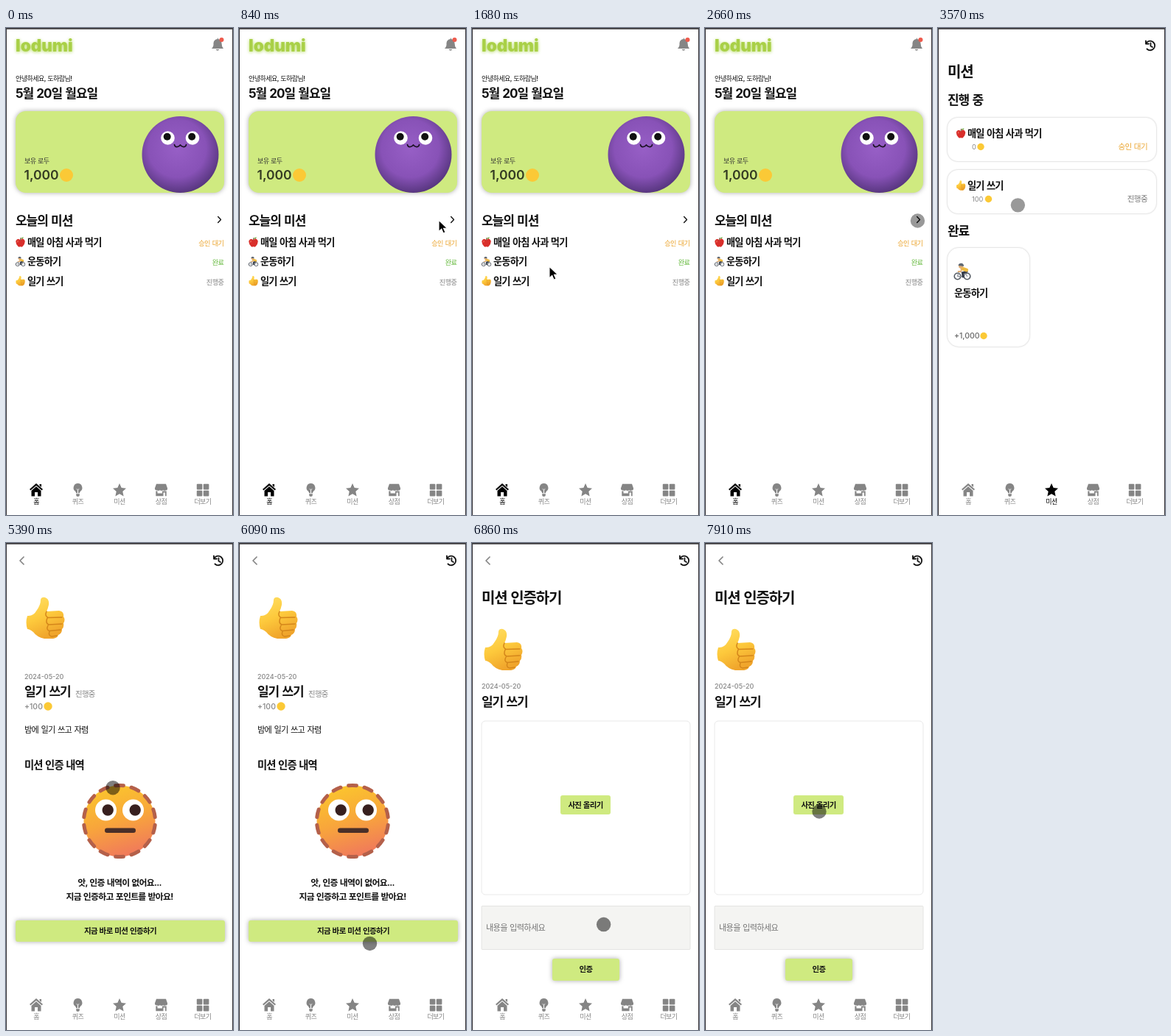
An HTML page that plays this animation: 308x662 px, repeating every 8 s.

```html
<!DOCTYPE html>
<html lang="ko">
<head>
<meta charset="utf-8">
<style>
  html, body { margin: 0; width: 100%; height: 100%; overflow: hidden; background: #fff; }
  svg { display: block; }
  text { font-family: Inter, "Noto Sans CJK KR", "Noto Sans CJK", sans-serif; letter-spacing: -.06em; word-spacing: .07em; white-space: pre; }
  .latin { letter-spacing: 0; }
  .card { fill: #fff; filter: drop-shadow(0 .6px 1px #0004); }
  .raised { filter: drop-shadow(0 .5px 3px #0005); }
  .glow { filter: drop-shadow(0 1px 2px #b8dc6a); }
</style>
</head>
<body>
<svg id="stage" width="308" height="662" viewBox="0 0 308 662">
  <defs>
    <radialGradient id="purple" cx=".46" cy=".42" r=".58">
      <stop offset="0" stop-color="#975fc6"/><stop offset=".65" stop-color="#8852b7"/><stop offset="1" stop-color="#593781"/>
    </radialGradient>
    <linearGradient id="orange" x1=".3" y1="0" x2=".6" y2="1">
      <stop offset="0" stop-color="#fbc62d"/><stop offset=".5" stop-color="#f8a63b"/><stop offset="1" stop-color="#f0785c"/>
    </linearGradient>
    <linearGradient id="skin" x1="0" y1="0" x2=".4" y2="1">
      <stop offset="0" stop-color="#ffe065"/><stop offset=".55" stop-color="#fdc93c"/><stop offset="1" stop-color="#f0a52c"/>
    </linearGradient>
    <symbol id="thumb" viewBox="0 0 54 58">
      <path fill="url(#skin)" d="M3 26Q11 27 16 18Q21 11 21 4Q22 0 27 1Q33 3 32 11Q31 16 29 20L46 19Q53 20 52 27Q55 31 52 36Q53 41 50 44Q50 50 45 52Q44 56 38 57L26 57Q16 55 11 48Q6 44 3 44Q0 35 3 26Z"/>
      <path fill="none" stroke="#d4861a" stroke-width="1.5" stroke-linecap="round" d="M29 20Q26 26 31 28.500L50 28M30 29Q27 36 32 38L50 37M31 39Q28 45 33 46.500L48 45M33 47Q31 53 36 54L43 53"/>
    </symbol>
    <symbol id="apple" viewBox="0 0 14 14">
      <path fill="#d92f2b" d="M7 4.5Q10-.1 13 5Q14 9 10 13Q8.500 14 7 13Q5.500 14 4 13Q0 9 1 5Q4 1 7 4.500Z"/>
      <path fill="#ef6b5c" d="M3 5Q5 4 4 7Q2 9 3 5Z"/>
      <path fill="none" stroke="#6d4325" d="M7 4.500L7.500 1"/>
      <path fill="#5da832" d="M7.500 2.500Q9 0 11.500.5Q10.500 3 7.500 2.500Z"/>
    </symbol>
    <symbol id="cyclist" viewBox="0 0 24 24">
      <g fill="none" stroke-linecap="round" stroke-linejoin="round">
        <path stroke="#535a62" stroke-width="1.600" d="M1.200 18.500a4.300 4.300 0 1 0 8.600 0a4.300 4.300 0 1 0-8.600 0M14.200 18.500a4.300 4.300 0 1 0 8.600 0a4.300 4.300 0 1 0-8.600 0"/>
        <path stroke="#8d939b" stroke-width="1.300" d="M5.500 18.500L7.500 12L16 14L11.500 19ZM16 14L18.500 18.500"/>
        <path stroke="#343b48" stroke-width="3" d="M18 12L12.500 14L13 19"/>
        <path stroke="#eebc42" stroke-width="5" d="M17.500 10L12 8"/>
        <path stroke="#e2ad72" stroke-width="1.800" d="M11 9L10 12L6.500 12"/>
      </g>
      <circle cx="10" cy="4.800" r="3" fill="#e2ad72"/>
      <path fill="#5f6873" d="M6.500 4Q7 .5 11 .7Q14 1 14 5Z"/>
    </symbol>
    <symbol id="home" viewBox="0 0 18 18">
      <path d="M9 0L18 8L16.600 9.600L9 2.900L1.400 9.600L0 8ZM13.500 1h2.500v4l-2.500-2ZM9 4.300L15.500 10V17.500H11V12H7V17.500H2.500V10Z"/>
    </symbol>
    <symbol id="bulb" viewBox="0 0 18 18">
      <path d="M9 0A6 6 0 0 0 5.500 10.800Q6.500 12 6.600 13.300H11.400Q11.500 12 12.500 10.800A6 6 0 0 0 9 0ZM6.700 14.300h4.600v2q0 1.700-2.300 1.700t-2.300-1.700Z"/>
      <path fill="none" stroke="#fff" stroke-width="1" d="M7.300 7.500L9 9L10.700 7.500M9 9V13.500"/>
    </symbol>
    <symbol id="star" viewBox="0 0 18 18"><path d="M9 0L11.700 6L18 6.700L13.300 11L14.600 17.500L9 14.200L3.400 17.500L4.700 11L0 6.700L6.300 6Z"/></symbol>
    <symbol id="store" viewBox="0 0 18 18">
      <path d="M2.500.8h13L17.700 7Q17.500 9.800 15 9.500Q13 10.500 12 9.300Q9 10.800 7.500 9.300Q5 10.500 3.700 9.500Q.5 9.800.3 7ZM1.800 10.500H4V13.500H10.500V10.500H12V17.300H1.800ZM12 10.500H16.200V17.300H14.500V12.500H12Z"/>
    </symbol>
    <symbol id="grid" viewBox="0 0 18 18">
      <rect x=".8" y=".8" width="7.600" height="7.600" rx="1"/><rect x="9.800" y=".8" width="7.600" height="7.600" rx="1"/>
      <rect x=".8" y="9.800" width="7.600" height="7.600" rx="1"/><rect x="9.800" y="9.800" width="7.600" height="7.600" rx="1"/>
    </symbol>
  </defs>
  <rect width="308" height="662" fill="#fff"/>
  <g id="pages"></g>
  <path fill="#3a383b" d="M0 0H308V662H307V1.800H1V662H0Z"/>
  <path id="arrow" fill="#000" stroke="#fff" stroke-width="1.100" d="M0 0V15.500L3.700 12L6.200 17.800L9 16.600L6.500 11H11.500Z"/>
  <g id="touch">
    <circle r="9.700"/>
    <circle id="ring" r="21.500" fill="none" stroke="#000" stroke-width="1.500"/>
  </g>
</svg>
<script>
const LOOP = 8000;
const GRAY = '#858585', AMBER = '#eba52f', LIME = '#cfea80';

// y is the vertical middle of the glyphs
const text = (x, y, size, str, { weight = 400, fill = '#111', anchor = 'start', cls = '' } = {}) =>
  `<text x="${x}" y="${y + size * .36}" font-size="${size}" font-weight="${weight}" fill="${fill}" text-anchor="${anchor}" class="${cls}">${str}</text>`;
const bold = (x, y, size, str, opts) => text(x, y, size, str, { weight: 700, ...opts });
const latin = (x, y, size, str, opts) => text(x, y, size, str, { fill: GRAY, cls: 'latin', weight: 500, ...opts });
const box = (x, y, w, h, r, attrs) => `<rect x="${x}" y="${y}" width="${w}" height="${h}" rx="${r}" ${attrs}/>`;
const icon = (id, x, y, w, h = w, fill = GRAY) =>
  `<use href="#${id}" x="${x}" y="${y}" width="${w}" height="${h}" fill="${fill}"/>`;
const circle = (x, y, r, fill) => `<circle cx="${x}" cy="${y}" r="${r}" fill="${fill}"/>`;
const line = (d, stroke, width) =>
  `<path d="${d}" fill="none" stroke="${stroke}" stroke-width="${width}" stroke-linecap="round" stroke-linejoin="round"/>`;
const coin = (x, y, r = 4.7) => circle(x, y, r, '#fbc936');
const button = (x, y, w, h, label, size) =>
  box(x, y, w, h, 3, `fill="${LIME}" class="raised"`) +
  bold(x + w / 2, y + h / 2 - .5, size, label, { anchor: 'middle' });

const nav = active => [['home', '홈'], ['bulb', '퀴즈'], ['star', '미션'], ['store', '상점'], ['grid', '더보기']]
  .map(([id, label], i) => {
    const x = 41 + i * 56.5, fill = i === active ? '#000' : GRAY;
    return icon(id, x - 9, 619, 18, 18, fill) + text(x, 644, 9, label, { fill, anchor: 'middle' });
  }).join('');

const history = line('M283 20A6.300 6.300 0 1 1 283.500 28.500M282 17.500V21.500H286M288.500 20.500V24.500L291 26', '#111', 1.8);
const back = line('M24 19L19 24L24 29', GRAY, 1.7);

const mascot = `
  ${circle(236.5, 172, 52, 'url(#purple)')}
  ${[219.5, 253].map(x => circle(x, 149.5, 9.3, '#fff') + circle(x - .8, 147.7, 5, '#111')).join('')}
  ${line('M228.500 158.500Q229 162 232.500 161.500Q235 161 236.500 159Q238 161 240.500 161.500Q244 162 244.500 158.500', '#191020', 1.7)}`;

const bell = `
  <path fill="${GRAY}" d="M279 28Q282 25 281.500 20.500Q282 15.500 287 15V13.500Q288 13 288 15Q292.500 16 292.500 20.500Q292.500 25 295 28ZM284.500 29H289.500Q287 32.500 284.500 29Z"/>
  ${circle(292.5, 16, 3, '#ee5a4c')}`;

const homeRows = [['apple', '매일 아침 사과 먹기', '승인 대기', AMBER], ['cyclist', '운동하기', '완료', '#65b93d'], ['thumb', '일기 쓰기', '진행중', GRAY]]
  .map(([id, name, state, fill], i) => {
    const y = 291 + i * 26.4;
    return icon(id, 12.5, y - 7, 14) + bold(29, y, 13.2, name) + text(295.5, y + 1.5, 9.2, state, { fill, anchor: 'end' });
  }).join('');

const homePage = `
  ${text(13, 24, 22.5, 'lodumi', { weight: 900, fill: '#a9d047', cls: 'latin glow' })}${bell}
  ${text(13, 69, 9, '안녕하세요, 도하람님!', { weight: 500 })}
  ${bold(13, 88.5, 17, '5월 20일 월요일')}
  ${box(13, 113, 283, 111, 14, `fill="${LIME}" class="raised"`)}${mascot}
  ${text(25, 181, 9, '보유 로두', { weight: 500, fill: '#333' })}
  ${latin(24.5, 200, 17.5, '1,000', { weight: 600, fill: '#333a22' })}${coin(82, 200, 9)}
  ${bold(13, 262, 17, '오늘의 미션')}${line('M287.700 256.500L291.500 260.500L287.700 264.500', '#111', 1.4)}
  ${homeRows}${nav(0)}`;

const missionCard = (y, id, name, points, coinX, state, fill) => `
  ${box(13, y, 283, 59, 14, 'class="card"')}${icon(id, 24, y + 14, 14)}
  ${bold(40, y + 21.5, 13.2, name)}${latin(46, y + 39.5, 9.2, points, { weight: 400 })}${coin(coinX, y + 39.5)}
  ${text(284, y + 39.5, 10.6, state, { fill, anchor: 'end' })}`;

const missionsPage = `
  ${history}${bold(13, 60, 20, '미션')}${bold(13, 98, 17, '진행 중')}
  ${missionCard(122, 'apple', '매일 아침 사과 먹기', '0', 58, '승인 대기', AMBER)}
  ${missionCard(193, 'thumb', '일기 쓰기', '100', 68.5, '진행중', '#777')}
  ${bold(13, 275.5, 17, '완료')}${box(13, 299, 111, 134, 15, 'class="card"')}
  ${icon('cyclist', 21, 319, 24)}${bold(22, 360, 13.2, '운동하기')}
  ${latin(22, 418, 10.5, '+1,000', { fill: '#666' })}${coin(62, 418.5)}
  ${nav(2)}`;

const face = `
  ${circle(154, 378, 48.5, 'url(#orange)')}
  <circle cx="154" cy="378" r="48.500" fill="none" stroke="#b4604a" stroke-width="5" stroke-linecap="round" pathLength="14" stroke-dasharray=".5 .5" stroke-dashoffset=".25" transform="rotate(-90 154 378)"/>
  ${[135.5, 172.5].map(x => circle(x, 363, 14.5, '#fff') + circle(x + 2.7, 363, 7.7, '#38201f')).join('')}
  ${box(134, 387.5, 42, 6.5, 3.2, 'fill="#4a2f28"')}`;

const detailPage = `
  ${back}${history}${icon('thumb', 26, 73, 54, 58)}
  ${latin(25, 182, 9, '2024-05-20')}
  ${bold(25, 202, 17, '일기 쓰기')}${text(94, 205, 10.4, '진행중', { fill: GRAY })}
  ${latin(25, 222, 10.5, '+100')}${coin(57, 222, 5.7)}
  ${text(25, 254, 11.2, '밤에 일기 쓰고 자렴')}
  ${bold(25, 302, 14.3, '미션 인증 내역')}${face}
  ${bold(154, 461.5, 11.9, '앗, 인증 내역이 없어요...', { anchor: 'middle' })}
  ${bold(154, 481, 11.9, '지금 인증하고 포인트를 받아요!', { anchor: 'middle' })}
  ${button(13, 513, 284, 29, '지금 바로 미션 인증하기', 10.5)}${nav()}`;

const uploadPage = `
  ${back}${history}${bold(13, 75, 20, '미션 인증하기')}${icon('thumb', 15, 116, 54, 58)}
  ${latin(13, 195, 9, '2024-05-20')}${bold(13, 215.5, 17, '일기 쓰기')}
  ${box(13, 242, 283, 236, 5, 'fill="#fff" stroke="#e9e9e9"')}
  ${box(120, 343, 68, 26, 3, `fill="${LIME}"`)}${bold(154, 356, 10.4, '사진 올리기', { anchor: 'middle' })}
  ${box(13, 493.5, 283, 59, 1, 'fill="#f4f4f2" stroke="#e4e4e2"')}${text(19, 523, 11.2, '내용을 입력하세요', { fill: '#777' })}
  ${button(109, 565, 91, 30, '인증', 10.4)}${nav()}`;

const pageStarts = [0, 2940, 5180, 6580];
const clicks = [[2310, 2450], [2800, 2940], [4900, 5040], [6370, 6510], [7770, 7910]];
// time, x, y
const route = [
  [490, 312, 310], [850, 270, 260], [1330, 197, 375], [1470, 150, 422], [1680, 104.5, 324.5], [1890, 200, 290],
  [2100, 292, 247], [2240, 290, 262], [2590, 290, 262], [2660, 288.5, 262], [2800, 285.5, 260.5],
  [2940, 288.5, 262], [3150, 288.5, 262], [3360, 215, 262], [3570, 108.5, 240.5], [3710, 92, 290], [3850, 115, 337],
  [3990, 131, 289], [4270, 131.5, 230], [5110, 131.5, 230], [5950, 172, 537], [6090, 177.5, 544.5],
  [6300, 181, 533], [6790, 181, 533], [7630, 153, 362], [7700, 155, 365], [LOOP, 155, 365]
];

const $ = id => document.getElementById(id);
const show = (el, visible) => el.setAttribute('display', visible ? 'inline' : 'none');
$('pages').innerHTML = [homePage, missionsPage, detailPage, uploadPage].map(p => `<g>${p}</g>`).join('');
const pages = [...$('pages').children];

function pointerAt(t) {
  const i = Math.max(1, route.findIndex(point => point[0] > t));
  const [t0, x0, y0] = route[i - 1], [t1, x1, y1] = route[i];
  const k = Math.max(0, (t - t0) / (t1 - t0));
  return [x0 + (x1 - x0) * k, y0 + (y1 - y0) * k];
}

function draw(now) {
  const t = now % LOOP;
  const page = pageStarts.filter(start => start <= t).length - 1;
  pages.forEach((el, i) => show(el, i === page));
  const move = `translate(${pointerAt(t)})`;
  $('arrow').setAttribute('transform', move);
  $('touch').setAttribute('transform', move);
  $('touch').firstElementChild.setAttribute('fill-opacity', page < 2 ? .4 : .5);
  show($('arrow'), t >= 560 && t < 2240);
  show($('touch'), t >= 2240);
  show($('ring'), clicks.some(([on, off]) => t >= on && t < off));
  requestAnimationFrame(draw);
}
requestAnimationFrame(draw);
</script>
</body>
</html>
```
